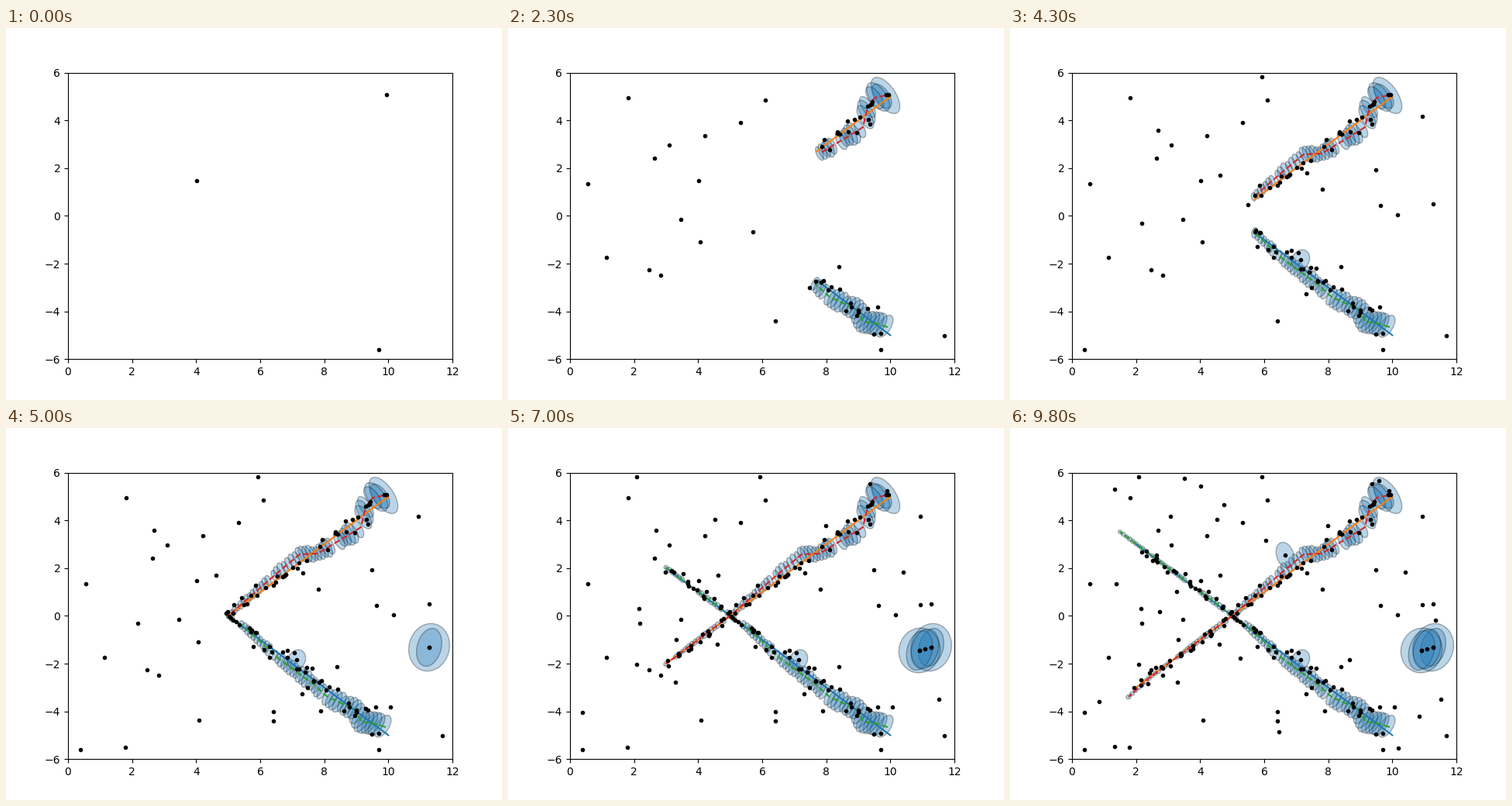
A matplotlib script for the animation above (9900 ms loop, 640 by 480 pixels).

```python
import matplotlib.pyplot as plt
import numpy as np
from matplotlib.animation import FuncAnimation
from matplotlib.patches import Ellipse
from matplotlib.transforms import Affine2D

FRAMES, INTERVAL = 99, 100
TRUTH_END = 80
ORIGIN = np.array([80, 242.4])               # sensor position on the stage
UNIT = np.array([496 / 12, -369.6 / 12])     # stage pixels per data unit
HIT_RATE = 0.88
BEARING_NOISE, RANGE_NOISE = 0.025, 0.1

# Bends of the two estimated tracks: step, x, y in stage pixels
UPPER = [(1, 487, 87), (4, 473, 90), (5, 464, 102), (9, 458, 128),
         (13, 442, 138), (23, 402, 162), (28, 379, 163), (34, 350, 187),
         (50, 287, 242), (76, 179, 323), (82, 153, 347)]
LOWER = [(1, 490, 386), (5, 474, 381), (8, 459, 379), (11, 450, 363),
         (18, 415, 347), (23, 396, 330), (34, 351, 297), (45, 308, 257),
         (50, 287, 242), (85, 142, 134)]

# Short-lived tracks: step, x, y, major, minor, angle
STRAYS = [(36, 375, 299, 27, 22, -60),
          (49, 546, 283, 62, 52, -75), (50, 546, 283, 50, 31, -75),
          (54, 531, 287, 58, 53, -75), (55, 531, 287, 52, 32, -75),
          (60, 538, 285, 52, 34, -75), (98, 355, 164, 34, 22, 72)]

rng = np.random.default_rng(12)


def to_stage(points):
    return ORIGIN + np.asarray(points) * UNIT


def with_steps(steps, points):
    return np.column_stack([steps, points])


def truth(sign):
    """Straight run from (10, 5 * sign), a tenth of a unit per step."""
    t = np.arange(TRUTH_END + 1) / 10
    return np.column_stack([10 - t, sign * (5 - t)])


def track(bends):
    """Estimated positions, one per step, along the bends."""
    step, x, y = np.array(bends).T
    steps = np.arange(1, step[-1] + 1)
    return np.column_stack(
        [steps, np.interp(steps, step, x), np.interp(steps, step, y)])


def detections(path):
    """Noisy bearing and range readings, some of them missed."""
    steps = np.arange(1, len(path))
    steps = steps[rng.random(len(steps)) < HIT_RATE]
    x, y = path[steps].T
    bearing = np.arctan2(y, x) + rng.normal(0, BEARING_NOISE, len(steps))
    reach = np.hypot(x, y) + rng.normal(0, RANGE_NOISE, len(steps))
    points = np.column_stack([np.cos(bearing), np.sin(bearing)])
    return with_steps(steps, to_stage(points * reach[:, None]))


def clutter():
    """False alarms all over the plot: dense at first, then a few late ones."""
    steps = np.r_[np.linspace(1, 85, 58).round(), 87:89, 91:94, 95:98]
    points = rng.uniform((0.3, -6), (12, 6), (len(steps), 2))
    return with_steps(steps, to_stage(points))


def track_ellipses(path, limit):
    """Uncertainty across the line of sight, shrinking with time."""
    for step, x, y in path:
        if rng.random() > HIT_RATE:
            continue
        scale = rng.uniform(0.85, 1.15)
        major = np.interp(step, [1, 2, 5, 10, 34, 50, 85],
                          [54, 42, 34, 28, 16, 9, 5.5])
        minor = np.interp(step, [1, 5, 23, 50, 85], [24, 15, 9, 6, 5])
        dx, dy = ((x, y) - ORIGIN) / UNIT
        angle = np.degrees(np.arctan2(dx * UNIT[1], -dy * UNIT[0]))
        yield (step, x, y, min(major * scale, limit),
               min(minor * scale, limit / 2), angle)


upper_truth, lower_truth = truth(1), truth(-1)
upper, lower = track(UPPER), track(LOWER)
opening = [(0, 246, 197), (0, 491, 86), (0, 481, 415)]
dots = np.vstack([opening, detections(upper_truth), detections(lower_truth),
                  clutter(), [stray[:3] for stray in STRAYS]])

fig, ax = plt.subplots(figsize=(6.4, 4.8), dpi=100)
ax.set_xlim(0, 12)
ax.set_ylim(-6, 6)
ax.set_autoscale_on(False)
# Stage pixels, counted from the top left corner
stage = Affine2D().scale(0.01, -0.01).translate(0, 4.8) + fig.dpi_scale_trans

ellipses = []
for step, x, y, major, minor, angle in sorted(
        [*track_ellipses(upper, 54), *track_ellipses(lower, 32), *STRAYS]):
    patch = Ellipse((x, y), major, minor, angle=angle, transform=stage,
                    facecolor="C0", edgecolor="black", alpha=0.3, zorder=1)
    ax.add_artist(patch)
    patch.set_clip_path(ax.patch)
    ellipses.append((step, patch))

truth_steps = np.arange(TRUTH_END + 1)
lines = []
for path, style, layer in (
        (with_steps(truth_steps, to_stage(lower_truth)), "C0-", 2),
        (with_steps(truth_steps, to_stage(upper_truth)), "C1-", 2),
        (lower, "C2--", 2), (upper, "C3--", 2), (dots, "k.", 2.2)):
    line, = ax.plot([], [], style, transform=stage, zorder=layer)
    lines.append((path, line))


def draw(step):
    for path, line in lines:
        seen = path[path[:, 0] <= step]
        line.set_data(seen[:, 1], seen[:, 2])
    for birth, patch in ellipses:
        patch.set_visible(birth <= step)
    return [artist for _, artist in lines + ellipses]


anim = FuncAnimation(fig, draw, frames=FRAMES, interval=INTERVAL,
                     repeat=True, repeat_delay=0)
plt.show()
```
